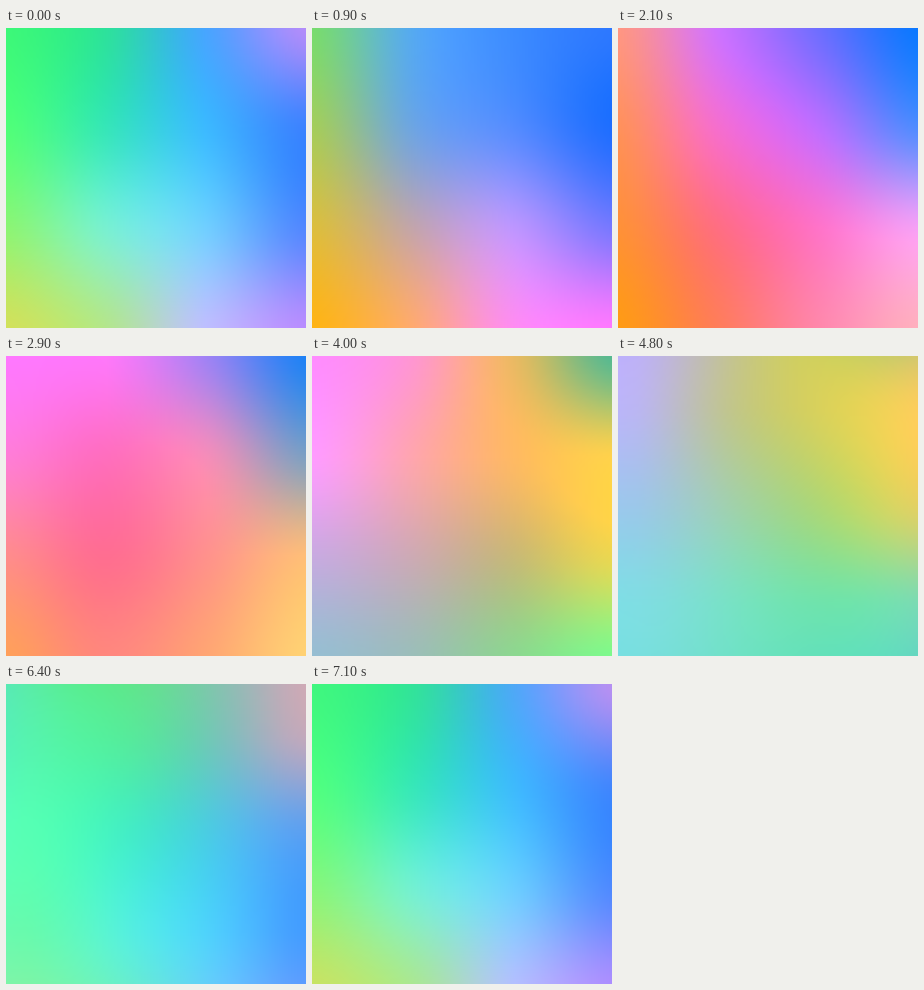
An HTML page with a canvas for the animation above (7200 ms loop, 300x300 px).

```html
<!DOCTYPE html>
<html lang="en">
<head>
<meta charset="utf-8">
<title>Drifting colours</title>
<style>
  html, body { margin: 0; width: 100%; height: 100%; overflow: hidden; }
  canvas { display: block; width: 100vw; height: 100vh; }
</style>
</head>
<body>
<canvas id="stage" width="300" height="300"></canvas>
<script>
const LOOP = 7200, STEP = 100, SIZE = 300, RES = 100;
const DRIFT = { x: -0.25, y: -0.65 }; // mesh cells per second

// Gradient meshes of 4 x 4 colours, row by row, at their times in ms.
const mesh = (time, colours) => ({
  time,
  points: colours.trim().split(/\s+/).map(c =>
    [0, 2, 4].map(i => parseInt(c.slice(i, i + 2), 16)))
});
const keys = [
  mesh(0, `
    3cf878 2de19b 48a5ff b48cfa
    50ff78 36e6b8 3cb9ff 3c82ff
    8cf573 78f0d0 70ceff 5287ff
    d2e15a b4e68c bebeff b98cff`),
  mesh(900, `
    78dc6e 55aaf0 3c8cff 2d78ff
    a5cd5a 6ea5e1 558cff 1e6eff
    dcbe3c c3a5aa be96ff 7878ff
    ffb414 ffaa6e ff8cf0 ff78ff`),
  mesh(2100, `
    ff9682 cd73ff 6e6eff 0a78ff
    ff915a f56ecd be6eff 508cff
    ff9137 ff6e82 ff73c8 f5a0f5
    ff9b14 ff7d5a ff87aa ffafbe`),
  mesh(2900, `
    ff78ff ff78fa a082f5 1e82f5
    ff7dd7 ff6ebe f58cb9 7da0c3
    ff8c8c ff6e91 ff918c ffbe78
    ffa05a ff877d ffa573 ffd273`),
  mesh(4000, `
    ff8cff ff96d2 ebb964 55b991
    ff9bff ffa5af ffb964 ffd24b
    c8aae1 cdaab4 c8b978 ebd750
    96bed2 9bbeb9 8cd791 7dfa8c`),
  mesh(5600, `
    78cdff 87e17d bee15a ffc373
    6ee6ff 78f5b4 96eb78 e6c378
    64fffa 55ffdc 55e1cd 78b4e1
    4bffeb 3cfae1 2dd7fa 32a5ff`)
];

const stage = document.getElementById("stage").getContext("2d");
const buffer = document.createElement("canvas");
buffer.width = buffer.height = RES;
const ctx = buffer.getContext("2d");
const image = ctx.createImageData(RES, RES);

const clamp = (v, lo, hi) => Math.min(hi, Math.max(lo, v));

// Cubic weights of the four mesh lines for a place between 0 and 3.
function weights(place) {
  const p = clamp(place, 0, 3), i = Math.min(2, Math.floor(p)), f = p - i;
  const cubic = [
    (-f + 2 * f * f - f ** 3) / 2,
    (2 - 5 * f * f + 3 * f ** 3) / 2,
    (f + 4 * f * f - 3 * f ** 3) / 2,
    (f ** 3 - f * f) / 2
  ];
  const w = [0, 0, 0, 0];
  cubic.forEach((c, k) => { w[clamp(i + k - 1, 0, 3)] += c; });
  return w;
}

function axis(shift) {
  return Array.from({ length: RES }, (_, i) => weights((i + 0.5) / RES * 3 - shift));
}

function addMesh(out, points, seconds, amount) {
  const wx = axis(DRIFT.x * seconds), wy = axis(DRIFT.y * seconds);
  for (let y = 0; y < RES; y++) {
    const row = [];
    for (let x = 0; x < 4; x++)
      for (let c = 0; c < 3; c++) {
        let sum = 0;
        for (let r = 0; r < 4; r++) sum += wy[y][r] * points[r * 4 + x][c];
        row.push(sum * amount);
      }
    for (let x = 0; x < RES; x++) {
      const w = wx[x], at = (y * RES + x) * 3;
      for (let c = 0; c < 3; c++)
        out[at + c] += w[0] * row[c] + w[1] * row[3 + c] + w[2] * row[6 + c] + w[3] * row[9 + c];
    }
  }
}

function draw(time) {
  let n = keys.length - 1;
  while (keys[n].time > time) n--;
  const from = keys[n], to = keys[(n + 1) % keys.length];
  const end = to.time || LOOP;
  const mix = (time - from.time) / (end - from.time);

  const out = new Float32Array(RES * RES * 3);
  addMesh(out, from.points, (time - from.time) / 1000, 1 - mix);
  if (mix > 0) addMesh(out, to.points, (time - end) / 1000, mix);

  for (let i = 0; i < RES * RES; i++) {
    for (let c = 0; c < 3; c++) image.data[i * 4 + c] = out[i * 3 + c];
    image.data[i * 4 + 3] = 255;
  }
  ctx.putImageData(image, 0, 0);
  stage.imageSmoothingQuality = "high";
  stage.drawImage(buffer, 0, 0, SIZE, SIZE);
}

const start = performance.now();
let shown = -1;
function tick() {
  const time = Math.floor(((performance.now() - start) % LOOP) / STEP) * STEP;
  if (time !== shown) draw(shown = time);
  requestAnimationFrame(tick);
}
tick();
</script>
</body>
</html>
```
